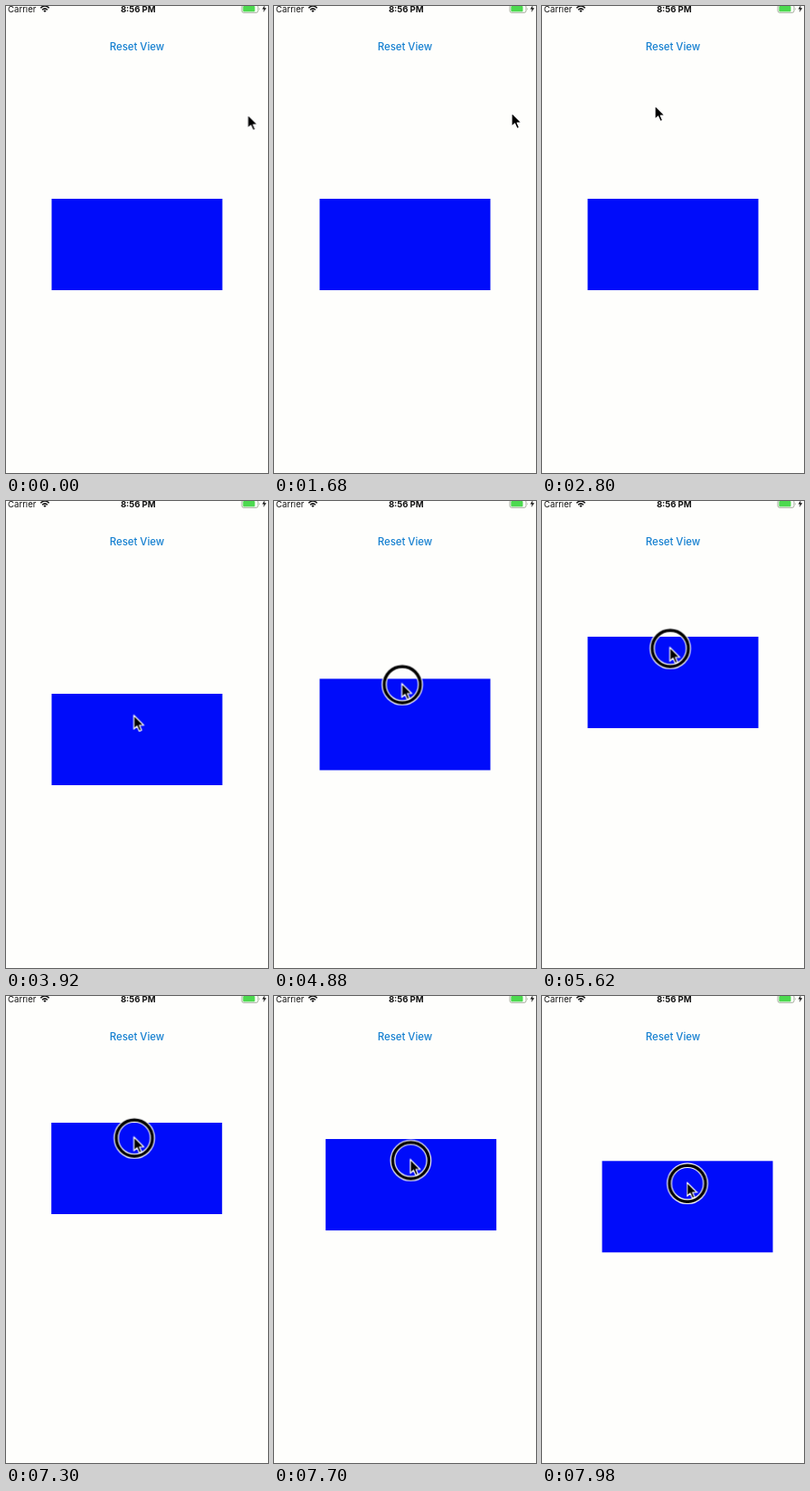
An HTML page for the animation above (8 s loop, 290 by 516 pixels).

```html
<!DOCTYPE html>
<html lang="en">
<head>
<meta charset="utf-8">
<title>Drag a view</title>
<style>
  html, body { margin: 0; width: 100%; height: 100%; overflow: hidden; background: #fefefc; }
  svg { display: block; width: 290px; height: 516px; }
  text { font-family: Inter, Roboto, sans-serif; fill: #111; }
  .status { font-size: 9.6px; }
  .time { font-weight: 700; font-size: 9.5px; text-anchor: middle; }
  .button { font-size: 11.4px; font-weight: 500; fill: #147fd0; text-anchor: middle; }

  #view, #pointer, #ring { animation: 8s linear infinite; }
  #view { animation-name: drag; }
  #pointer { animation-name: move; }
  #ring { animation-name: press; }

  @keyframes move {
    0%, .25% { transform: translate(267.5px, 120px); animation-timing-function: ease-out; }
    3.5%, 21% { transform: translate(263px, 118px); animation-timing-function: ease-in-out; }
    26%, 35% { transform: translate(125px, 110px); animation-timing-function: ease-in-out; }
    44%, 45.25% { transform: translate(138px, 215px); animation-timing-function: ease-out; }
    49%, 52.75% { transform: translate(141.5px, 236.7px); }
    61% { transform: translate(141.5px, 201.7px); }
    70.25% { transform: translate(141.5px, 161.7px); }
    72%, 73.25% { transform: translate(141.5px, 157.7px); animation-timing-function: ease-out; }
    78.5%, 91.25% { transform: translate(141.5px, 155.7px); animation-timing-function: cubic-bezier(.35, 0, .75, .8); }
    99.75%, 100% { transform: translate(160.5px, 206px); }
  }
  @keyframes drag {
    0%, 57% { transform: translate(50.5px, 213px); }
    61% { transform: translate(50.5px, 196.5px); }
    70.25% { transform: translate(50.5px, 150px); }
    72%, 73.25% { transform: translate(50.5px, 142.5px); animation-timing-function: ease-out; }
    78.5%, 91.25% { transform: translate(50.2px, 140px); animation-timing-function: cubic-bezier(.45, 0, .75, .75); }
    99.75%, 100% { transform: translate(66.5px, 182.3px); }
  }
  @keyframes press {
    0%, 52.74% { opacity: 0; }
    52.75%, 100% { opacity: 1; }
  }
</style>
</head>
<body>
<svg viewBox="0 0 290 516">
  <text class="status" x="2" y="6.9">Carrier</text>
  <g fill="none" stroke="#111" stroke-width="1.5">
    <path d="M38.3 2.2Q43 -2.2 47.7 2.2M40.1 4.2Q43 1.5 45.9 4.2"/>
    <path d="M41.4 5.2Q43 4 44.6 5.2L43 7Z" fill="#111" stroke="none"/>
  </g>
  <text class="status time" x="146.3" y="6.9">8:56 PM</text>
  <rect x="261" y="-1" width="18" height="8.3" rx="2" fill="none" stroke="#8f9a84" stroke-width=".8"/>
  <rect x="262.3" y="0" width="13.2" height="6.2" rx="1" fill="#4cd94f"/>
  <path d="M280.2 2v2.6q1.2 -1.3 0 -2.6Z" fill="#8f9a84"/>
  <path d="M286.6 -1L283.6 3.4H285.7L284.8 7L288.2 2.3H286Z" fill="#111"/>
  <text class="button" x="145" y="48.8">Reset View</text>

  <rect id="view" width="189" height="101" fill="#000cfa"/>

  <g id="pointer">
    <g id="ring" fill="none">
      <circle cx=".5" cy="1.2" r="20" stroke="#fff" stroke-width="5.8"/>
      <circle cx=".5" cy="1.2" r="20" stroke="#000" stroke-width="3.4"/>
    </g>
    <path d="M0 0V15.2L3.5 12L6 17.6L8.6 16.4L6.2 11H11Z"
      fill="#000" stroke="#fff" stroke-width="1.2" stroke-linejoin="round"/>
  </g>
</svg>
</body>
</html>
```
